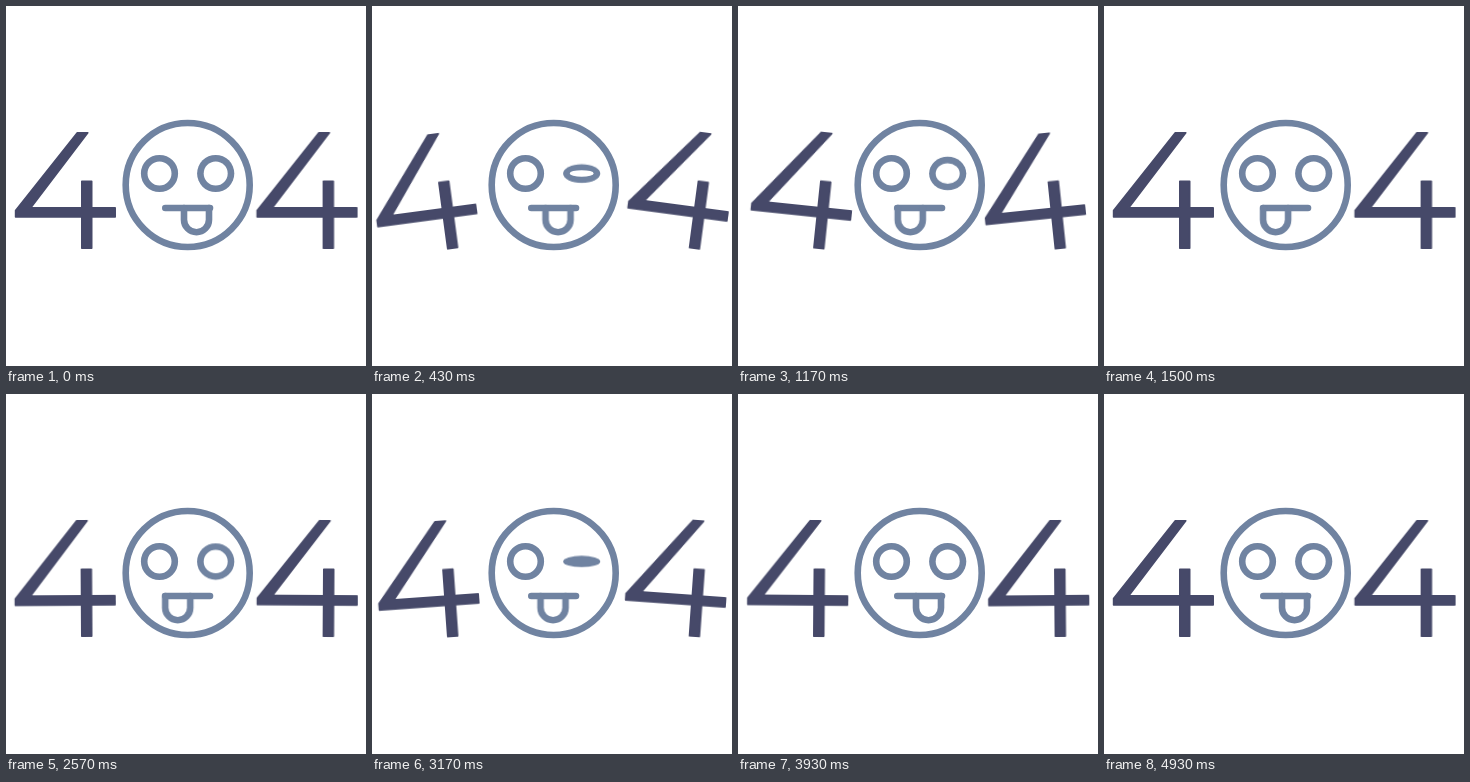
Recreate the animation shown at these times as an HTML page. Size 360 by 360 pixels, loop 5010 ms.

```html
<!DOCTYPE html>
<html lang="en">
<head>
<meta charset="utf-8">
<title>404</title>
<style>
  html, body { margin: 0; height: 100%; overflow: hidden; background: #fff; }
  svg { display: block; width: 100vw; height: 100vh; }

  .four {
    fill: #464969; stroke: #464969; stroke-width: 1.6; stroke-linejoin: round;
    transform-origin: 80.7px 243px;
    animation: swing 2505ms infinite;
  }
  .left { --out: -8deg; --in: 8deg; }
  .right { --out: 8deg; --in: -8deg; }

  .line { fill: none; stroke: #7083a1; stroke-width: 6.6; stroke-linecap: round; }
  .lid { fill: #7083a1; animation: lid 2505ms infinite; }
  .hole { fill: #fff; animation: hole 2505ms infinite; }
  .lid, .hole { transform-origin: 209.7px 167.5px; }
  .tongue { animation: tongue 5010ms infinite; }

  .four, .lid, .hole, .tongue { animation-timing-function: cubic-bezier(.364, 0, .636, 1); }

  @keyframes swing {
    0%, 60%, 100% { transform: rotate(0deg); }
    20% { transform: rotate(var(--out)); }
    40% { transform: rotate(var(--in)); }
  }
  @keyframes lid {
    0%, 53.33%, 100% { transform: scaleY(1); }
    26.67% { transform: scaleY(.31); }
  }
  @keyframes hole {
    0%, 53.33%, 100% { transform: scaleY(1); }
    26.67% { transform: scaleY(0); }
  }
  @keyframes tongue {
    0%, 76.67%, 100% { transform: translateX(0); }
    26.67%, 50% { transform: translateX(-18.9px); }
  }
</style>
</head>
<body>
<svg viewBox="0 0 360 360">
  <defs>
    <path id="four" d="M71.3 126.8H81.8L24.6 201.9H75.8V175.2H85.7V201.9H109.2V210.9H85.7V242.2H75.8V210.9H9.6V204.4Z"/>
  </defs>

  <use href="#four" class="four left"/>
  <g transform="translate(241.6 0)"><use href="#four" class="four right"/></g>

  <circle class="line" cx="181.7" cy="179" r="62"/>
  <circle class="line" cx="153.5" cy="167.5" r="15.3"/>
  <circle class="lid" cx="209.7" cy="167.5" r="18.6"/>
  <circle class="hole" cx="209.7" cy="167.5" r="12"/>

  <path class="line" d="M159.3 202H204"/>
  <path class="line tongue" d="M178 202V213.7A12.5 12.5 0 0 0 203 213.7V202"/>
</svg>
</body>
</html>
```
